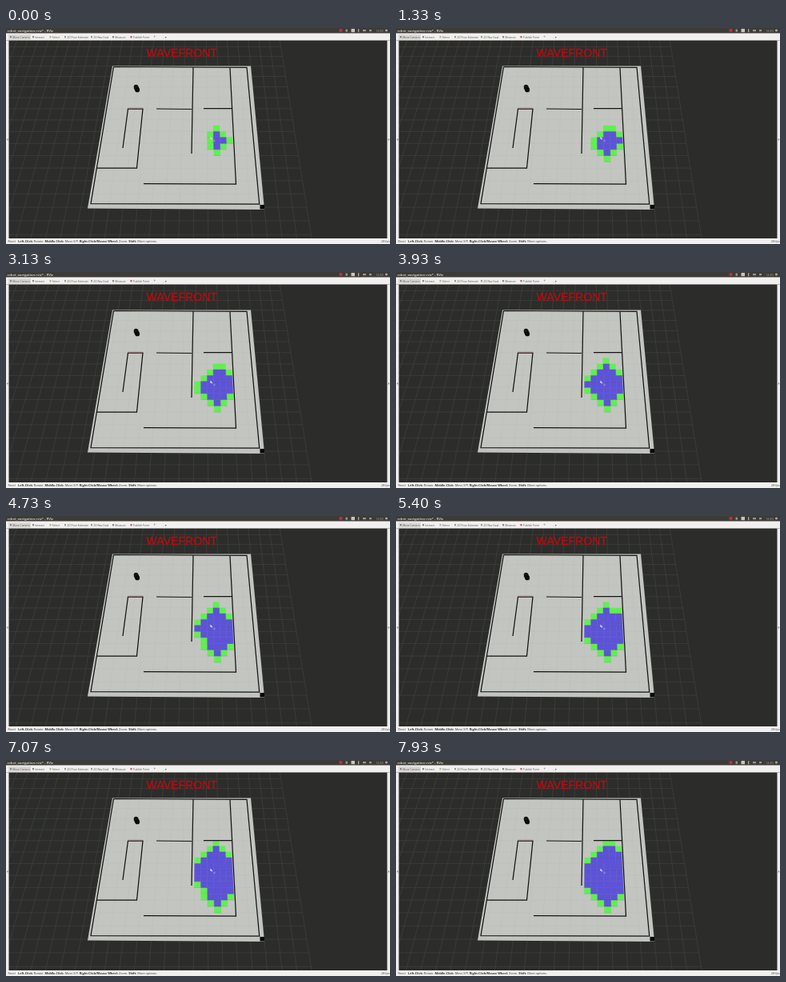
Write an HTML page with a canvas that moves like this. It is 480 px wide and 270 px high and loops after 8000 ms.

```html
<!DOCTYPE html>
<html lang="en">
<head>
<meta charset="utf-8">
<title>Wavefront</title>
<style>
  html, body { margin: 0; width: 100%; height: 100%; overflow: hidden; background: #2c2d2a; }
  canvas { display: block; width: 480px; height: 270px; }
</style>
</head>
<body>
<canvas id="stage" width="480" height="270"></canvas>
<script>
const ctx = document.getElementById('stage').getContext('2d');
const LOOP = 8000;
const COLS = 25;
const ORIGIN_COL = 18;

// Perspective floor: columns fan out with y, rows grow toward the viewer.
const colX = (col, y) => 133 - 0.174 * (y - 48) + col / COLS * (173 + 0.27 * (y - 48));
const rowY = r => 136.8 + 7.43 * r + 0.045 * r * r;

function rect(x, y, w, h, color) {
  ctx.fillStyle = color;
  ctx.fillRect(x, y, w, h);
}

function polygon(points, color) {
  ctx.fillStyle = color;
  ctx.beginPath();
  points.forEach(([x, y]) => ctx.lineTo(x, y));
  ctx.fill();
}

function line(points, color, width) {
  ctx.strokeStyle = color;
  ctx.lineWidth = width;
  ctx.beginPath();
  points.forEach(([x, y], i) => i ? ctx.lineTo(x, y) : ctx.moveTo(x, y));
  ctx.stroke();
}

function disc(x, y, r, color) {
  ctx.fillStyle = color;
  ctx.beginPath();
  ctx.arc(x, y, r, 0, Math.PI * 2);
  ctx.fill();
}

function label(text, x, y, size, color, bold = false) {
  ctx.font = `${bold ? 'bold ' : ''}${size}px "Open Sans", sans-serif`;
  ctx.fillStyle = color;
  ctx.fillText(text, x, y);
}

// Breadth-first order in which the wave visits the room.
function floodOrder() {
  const steps = [[0, 1], [1, 0], [0, -1], [-1, 0]];
  const seen = new Set(['0,0']);
  const order = [{ col: 0, row: 0, parent: -1 }];
  for (let i = 0; i < 60 && i < order.length; i++) {
    for (const [dc, dr] of steps) {
      const col = order[i].col + dc, row = order[i].row + dr;
      const key = col + ',' + row;
      if (seen.has(key) || col < -3 || col > 2 || row < -5 || row > 6) continue;
      seen.add(key);
      order.push({ col, row, parent: i });
    }
  }
  return order;
}
const order = floodOrder();

function drawGrid(color, spacing, fromCol, toCol, fromRow, toRow) {
  for (let c = fromCol; c <= toCol; c += spacing) {
    line([[colX(c, 15), 15], [colX(c, 264), 264]], color, 0.6);
  }
  for (let r = fromRow; r <= toRow; r += spacing) {
    const y = rowY(r);
    line([[colX(fromCol, y), y], [colX(toCol, y), y]], color, 0.6);
  }
}

function drawFloor() {
  rect(0, 0, 480, 270, '#2c2d2a');
  drawGrid('#434541', 2, -25, 31, -19, 17);

  const board = [[133, 47.5], [306, 47.5], [323, 227], [102, 225.5]];
  polygon(board, '#c3c5c1');
  ctx.save();
  ctx.beginPath();
  board.forEach(([x, y]) => ctx.lineTo(x, y));
  ctx.clip();
  drawGrid('rgba(145,147,146,.12)', 2, -1, 27, -15, 13);
  ctx.restore();
}

function drawWalls() {
  const walls = [
    [[134.5, 48.5], [301, 49.3], [316.7, 220], [106, 219.7], [134.5, 48.5]],
    [[234, 49], [232, 157]],
    [[280, 50], [287.5, 195], [172, 194.5]],
    [[188, 101], [232, 101.5]],
    [[247, 100.5], [283, 100.5]],
    [[146, 150], [152.5, 101], [171, 101], [163.5, 175], [113, 175]]
  ];
  walls.forEach(points => line(points, '#141513', 1.25));
  line([[152, 100], [171, 100]], '#b98580', 0.8);
  rect(317.5, 221, 5.5, 5.5, '#050505');
  line([[162.3, 73.8], [164.2, 77.2]], '#141513', 6);
  disc(162.5, 73.6, 2.8, '#141513');
  disc(164.2, 77.4, 2.9, '#0b0c0b');
}

function drawCell({ col, row }, color) {
  const top = rowY(row), bottom = rowY(row + 1);
  const left = ORIGIN_COL + col, right = left + 1;
  const corners = [
    [colX(left, top), top], [colX(right, top), top],
    [colX(right, bottom), bottom], [colX(left, bottom), bottom]
  ];
  polygon(corners, color);
  // A thin outline closes the antialiasing seams between neighbours.
  line([...corners, corners[0]], color, 0.4);
  line([corners[3], corners[2]], 'rgba(50,50,130,.22)', 0.5);
}

function drawWave(visited) {
  const frontier = order.filter((cell, i) => i >= visited && cell.parent < visited);
  frontier.forEach(cell => drawCell(cell, '#62ee50'));
  order.slice(0, visited).forEach(cell => drawCell(cell, '#5d53d5'));
}

function drawCursor() {
  polygon([[255.3, 135.5], [255.3, 139], [256.4, 138.4], [257.6, 140], [258, 138]], '#d5d4ea');
  line([[258.8, 141], [262.2, 141]], '#9490cc', 0.7);
  line([[260.5, 139.4], [260.5, 142.6]], '#9490cc', 0.7);
}

function drawWindow() {
  rect(0, 0, 480, 6.5, '#3c3b37');
  label('robot_navigation.rviz* - RViz', 1.5, 4.8, 4.1, '#c9c5bc', true);
  disc(418.5, 3, 2.2, '#b3343a');
  rect(424.5, 1.6, 2.5, 3.2, '#96938c');
  rect(431.5, 1, 4.5, 4.2, '#c8c5bd');
  rect(440, 1.2, 1.3, 4, '#a9a69e');
  rect(446, 2, 4, 2.3, '#96938c');
  rect(454, 2, 3, 2.3, '#96938c');
  label('12:30', 462, 4.7, 3.8, '#a9a69e');
  disc(475.5, 3, 1.6, '#a9a69e');

  rect(0, 6.5, 480, 9, '#f1f0ee');
  rect(3, 8, 28, 6.8, '#dad8d5');
  const tools = [
    [5, '#888888', 'Move Camera'], [33, '#888888', 'Interact'],
    [54.5, '#a9b58b', 'Select'], [73, '#88aa77', '2D Pose Estimate'],
    [106, '#88aa77', '2D Nav Goal'], [133, '#888888', 'Measure'],
    [155.5, '#b85b52', 'Publish Point']
  ];
  tools.forEach(([x, color, text]) => {
    rect(x, 10, 2, 2.4, color);
    label(text, x + 3.3, 12.6, 3.3, '#555553');
  });
  label('+', 184.5, 13, 4.5, '#666666');
  label('- ▾', 196.5, 13, 4, '#666666');

  rect(0, 15.5, 3.5, 248, '#eeedeb');
  rect(476.5, 15.5, 3.5, 248, '#eeedeb');
  polygon([[2.5, 138], [2.5, 141], [1, 139.5]], '#777777');
  polygon([[477.8, 138], [477.8, 141], [479.3, 139.5]], '#777777');
  rect(0, 263, 480, 7, '#f1f0ee');
  drawStatus();
}

function drawStatus() {
  label('Reset', 2.5, 267.9, 3.7, '#454543');
  const hints = [
    ['Left-Click:', ' Rotate. '], ['Middle-Click:', ' Move X/Y. '],
    ['Right-Click/Mouse Wheel:', ' Zoom. '], ['Shift:', ' More options.']
  ];
  let x = 15;
  hints.forEach(pair => pair.forEach((text, i) => {
    label(text, x, 267.9, 3.8, '#333332', i === 0);
    x += ctx.measureText(text).width;
  }));
  label('28 fps', 469, 267.9, 3.8, '#454543');
}

function drawTitle() {
  ctx.font = '14.1px "Liberation Sans", Arial, sans-serif';
  ctx.fillStyle = ctx.strokeStyle = '#b90d13';
  ctx.lineWidth = 0.3;
  ctx.fillText('WAVEFRONT', 175.5, 35.5);
  ctx.strokeText('WAVEFRONT', 175.5, 35.5);
}

let shown = -1;
function frame(now) {
  const seconds = now % LOOP / 1000;
  const visited = Math.floor(4.1 + 5.085 * seconds);
  if (visited !== shown) {
    shown = visited;
    drawFloor();
    drawWave(visited);
    drawWalls();
    drawTitle();
    drawCursor();
    drawWindow();
  }
  requestAnimationFrame(frame);
}
frame(0);
</script>
</body>
</html>
```
